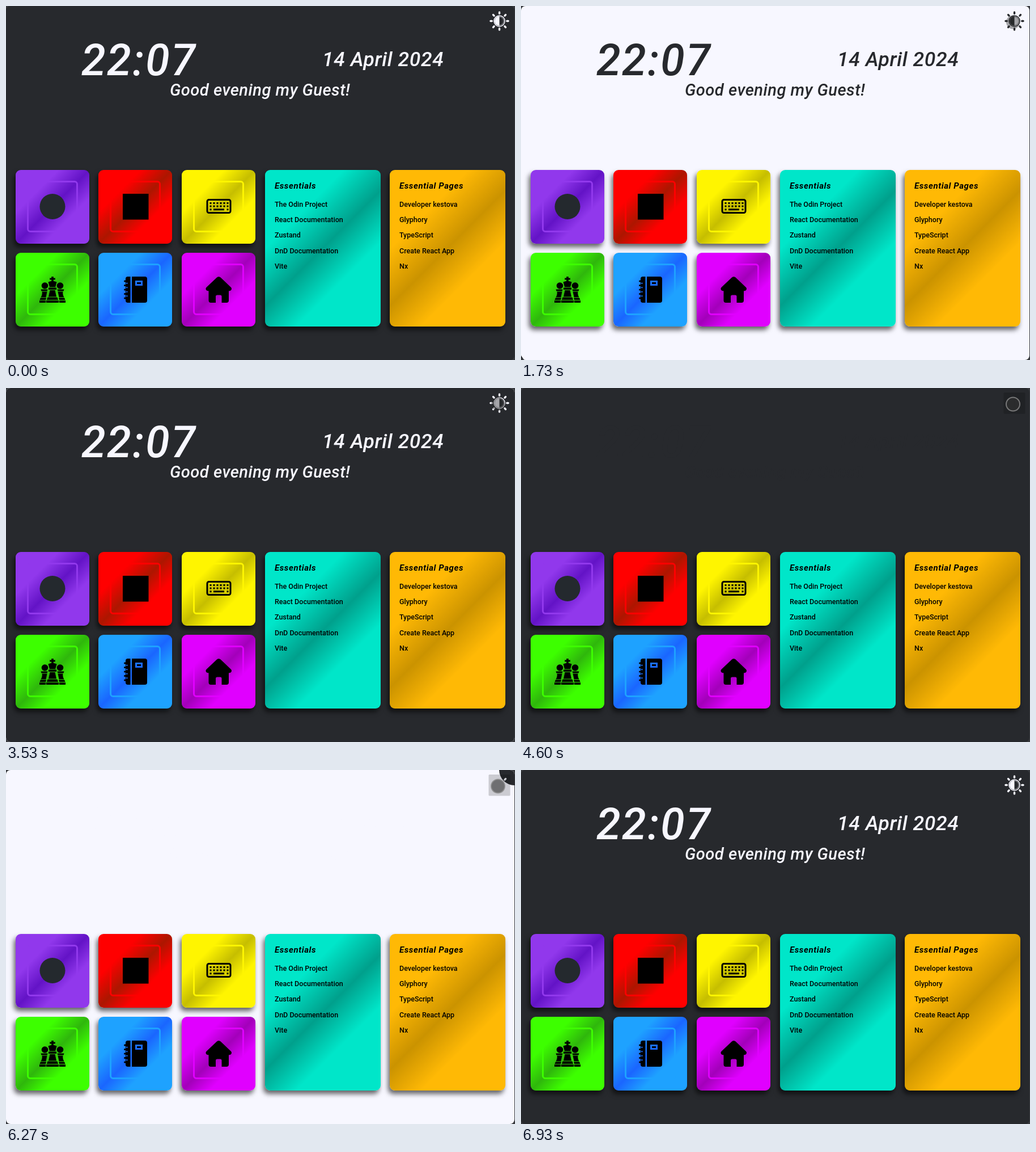
Write an HTML page that moves like this. It is 898 px wide and 624 px high and loops after 7740 ms.

```html
<!DOCTYPE html>
<html lang="en">
<head>
<meta charset="utf-8">
<title>Start page</title>
<style>
  html, body { margin: 0; width: 100%; height: 100%; overflow: hidden; background: #37393d; }
  #page {
    position: absolute; left: 0; top: 0; width: 897px; height: 624px;
    overflow: hidden; border-radius: 8px;
    --dark: #27292d; --light: #f7f7ff;
    font-family: Roboto, "Open Sans", sans-serif;
  }
  svg { position: absolute; left: 0; top: 0; width: 897px; height: 624px; }
  .head { font-style: italic; font-weight: 500; fill: var(--ink); }
  .card {
    position: absolute; top: 288.5px; width: 130px; height: 130px; border-radius: 9px;
    background: linear-gradient(135deg, var(--a) 29%, var(--b) 50%, var(--a) 69%);
    box-shadow: -3px 6px 8px rgba(0, 0, 0, .6);
  }
  .card.low { top: 435.2px; }
  .card.tall { width: 203.8px; height: 276.7px; }
  .card:not(.tall)::after {
    content: ""; position: absolute; left: 20px; top: 19px; width: 84px; height: 85px;
    border: 3px solid var(--a); border-radius: 6px;
  }
  .title { font: italic 700 15px Roboto, "Open Sans", sans-serif; letter-spacing: .6px; }
  .item { font-size: 12.5px; font-weight: 500; }
</style>
</head>
<body>
<div id="page">
  <svg viewBox="0 0 897 624">
    <rect id="back" width="897" height="624"/>
    <circle id="reveal" cx="897" cy="0"/>
    <g class="head">
      <text x="133" y="122" font-size="77.500" letter-spacing="2.400">22:07</text>
      <text x="558" y="105.500" font-size="35.600" letter-spacing=".6">14 April 2024</text>
      <text x="289" y="158" font-size="29.200" letter-spacing=".45">Good evening my Guest!</text>
    </g>
  </svg>

  <div class="card" style="left:16.5px;--a:#9138ec;--b:#6313c6"></div>
  <div class="card" style="left:163.2px;--a:#ff0000;--b:#ad1600"></div>
  <div class="card" style="left:310px;--a:#fff500;--b:#c6be00"></div>
  <div class="card low" style="left:16.5px;--a:#3dff00;--b:#2fb70c"></div>
  <div class="card low" style="left:163.2px;--a:#1ea2ff;--b:#1a66ff"></div>
  <div class="card low" style="left:310px;--a:#e000ff;--b:#a300ba"></div>
  <div class="card tall" style="left:456.8px;--a:#00e6c9;--b:#00a08c"></div>
  <div class="card tall" style="left:677.2px;--a:#ffb905;--b:#cb9300"></div>

  <svg viewBox="0 0 897 624">
    <circle cx="82" cy="353.5" r="22.5" fill="#24292e"/>
    <rect x="206" y="331" width="45.5" height="45.5"/>

    <g id="keyboard">
      <rect x="355" y="341.5" width="41" height="23" rx="3" fill="none" stroke="#000" stroke-width="3"/>
      <path d="M359.5 347.5h33M359.5 353h33" stroke="#000" stroke-width="3" stroke-dasharray="3 3"/>
      <path d="M359.5 358.8h3M366 358.8h19M389.5 358.8h3" stroke="#000" stroke-width="3"/>
    </g>

    <g id="chess">
      <g id="pawn">
        <circle cx="68.5" cy="493" r="5.8"/>
        <path d="M61.5 499.5h12l-1 3h-10zM63.5 503.500h9l-2 10h-9q3-5 2-10zM61 514.500h10l-1 3.500h-10.500zM59 519h11v4h-11z"/>
      </g>
      <use href="#pawn" transform="matrix(-1 0 0 1 164 0)"/>
      <path d="M80.2 477h3.6v2.5h3v3h-3v3h-3.6v-3h-3v-3h3z"/>
      <path d="M74.5 486.5q7.5-3.5 15 0l-2.500 9h-10zM75 496.500h14v3.500h-14zM77.500 501h9l2.500 11.500h-14zM73.500 513.500h17l1.500 4.500h-20zM71 519h22v4h-22z"/>
    </g>

    <g id="notebook">
      <path d="M215 477h4.5v46h-4.5q-4 0-4-4v-38q0-4 4-4z"/>
      <path fill-rule="evenodd" d="M222 477h23q4 0 4 4v38q0 4-4 4h-23zM228 484h13v9h-13zM231 487v3h7v-3z"/>
      <path d="M209.5 485h5M209.5 492.5h5M209.5 500h5M209.5 507.5h5M209.5 515h5" stroke="#000" stroke-width="3" stroke-linecap="round"/>
      <path d="M212 488.7h2.5M212 496.2h2.5M212 503.7h2.5M212 511.2h2.5" stroke="#1a6cff" stroke-width="2"/>
    </g>

    <path id="house" d="M372 478.500q3.300-2.700 6.600 0L397 496q2 2.500 0 5-1.500 1.500-4 1.300V519q0 4-4 4h-8.500v-11q0-2.500-2.500-2.500h-5.500q-2.500 0-2.500 2.500v11h-8.500q-4 0-4-4v-16.700q-2.500.2-4-1.300-2-2.500 0-5z"/>

    <g id="lists"></g>

    <g id="sun" transform="translate(870.5 26.5)" style="fill:var(--ink);stroke:var(--ink)">
      <g id="rays" stroke-width="3.4" stroke-linecap="round"></g>
      <circle r="9.5" fill="none" stroke-width="1.6"/>
      <path d="M0-8.5a8.5 8.5 0 0 0 0 17z" stroke="none"/>
      <path d="M0-7.5a7.5 7.5 0 0 1 0 15" fill="none" stroke-width=".6"/>
    </g>
    <rect id="tap" x="851.5" y="8" width="38" height="37.5" rx="1.5" fill="#000" fill-opacity=".18"/>
    <circle id="touch" cy="28.5" r="12"/>
  </svg>
</div>

<script>
const LOOP = 7740, FPS = 15, GROW = 750, REACH = Math.hypot(897, 624);
const $ = id => document.getElementById(id);
const page = $('page'), back = $('back'), reveal = $('reveal'), tap = $('tap'), touch = $('touch');

// Step of the theme switch, and the time its circle starts to grow
const switches = [
  { step: 15, start: 1018 },
  { step: 42, start: 2786 },
  { step: 69, start: 4614 },
  { step: 94, start: 6183 }
];

const columns = [
  [474, 'Essentials', 'The Odin Project', 'React Documentation', 'Zustand', 'DnD Documentation', 'Vite'],
  [694, 'Essential Pages', 'Developer kestova', 'Glyphory', 'TypeScript', 'Create React App', 'Nx']
];
$('lists').innerHTML = columns.map(([x, title, ...items]) =>
  `<text class="title" x="${x}" y="321.5">${title}</text>` +
  items.map((s, i) => `<text class="item" x="${x}" y="${353.5 + 27.4 * i}">${s}</text>`).join('')
).join('');

$('rays').innerHTML = Array.from({ length: 8 }, (_, i) =>
  `<path d="M0-13.3V-15.5" transform="rotate(${45 * i})"/>`).join('');

const clamp = v => Math.min(1, Math.max(0, v));

// cubic-bezier(.42, 0, .58, 1)
function easeInOut(x) {
  let lo = 0, hi = 1;
  for (let i = 0; i < 24; i++) {
    const s = (lo + hi) / 2, q = 1 - s;
    if (1.26 * s * q * q + 1.74 * s * s * q + s * s * s < x) lo = s; else hi = s;
  }
  return lo * lo * (3 - 2 * lo);
}

function touchX(step) {
  const enter = 1 - clamp((step - 6) / 4), leave = clamp((step - 97) / 5);
  return 868 + 50 * (enter * enter + leave * leave);
}

function draw(ms) {
  const step = Math.floor((ms + 4) * FPS / 1000), time = step * 1000 / FPS;
  const past = switches.filter(s => step >= s.step);
  const last = past[past.length - 1];
  const isLight = past.length % 2 === 1;
  const pair = ['var(--dark)', 'var(--light)'];
  const fresh = pair[+isLight], stale = pair[+!isLight];
  const grown = last ? clamp((time - last.start) / GROW) : 1;
  const pressed = !!last && step === last.step;

  page.style.setProperty('--ink', stale);
  back.style.fill = grown < 1 ? stale : fresh;
  reveal.style.fill = fresh;
  reveal.setAttribute('r', REACH * easeInOut(grown));

  tap.style.visibility = pressed ? 'visible' : 'hidden';
  touch.setAttribute('cx', touchX(step));
  touch.style.fill = pressed ? 'rgba(50,50,50,.6)' : 'rgba(40,40,40,.4)';
  touch.style.stroke = pressed ? 'rgba(140,140,140,.8)' : 'none';
  touch.style.strokeWidth = 2;
}

const origin = performance.now();
function tick() {
  draw((performance.now() - origin) % LOOP);
  requestAnimationFrame(tick);
}
tick();
</script>
</body>
</html>
```
